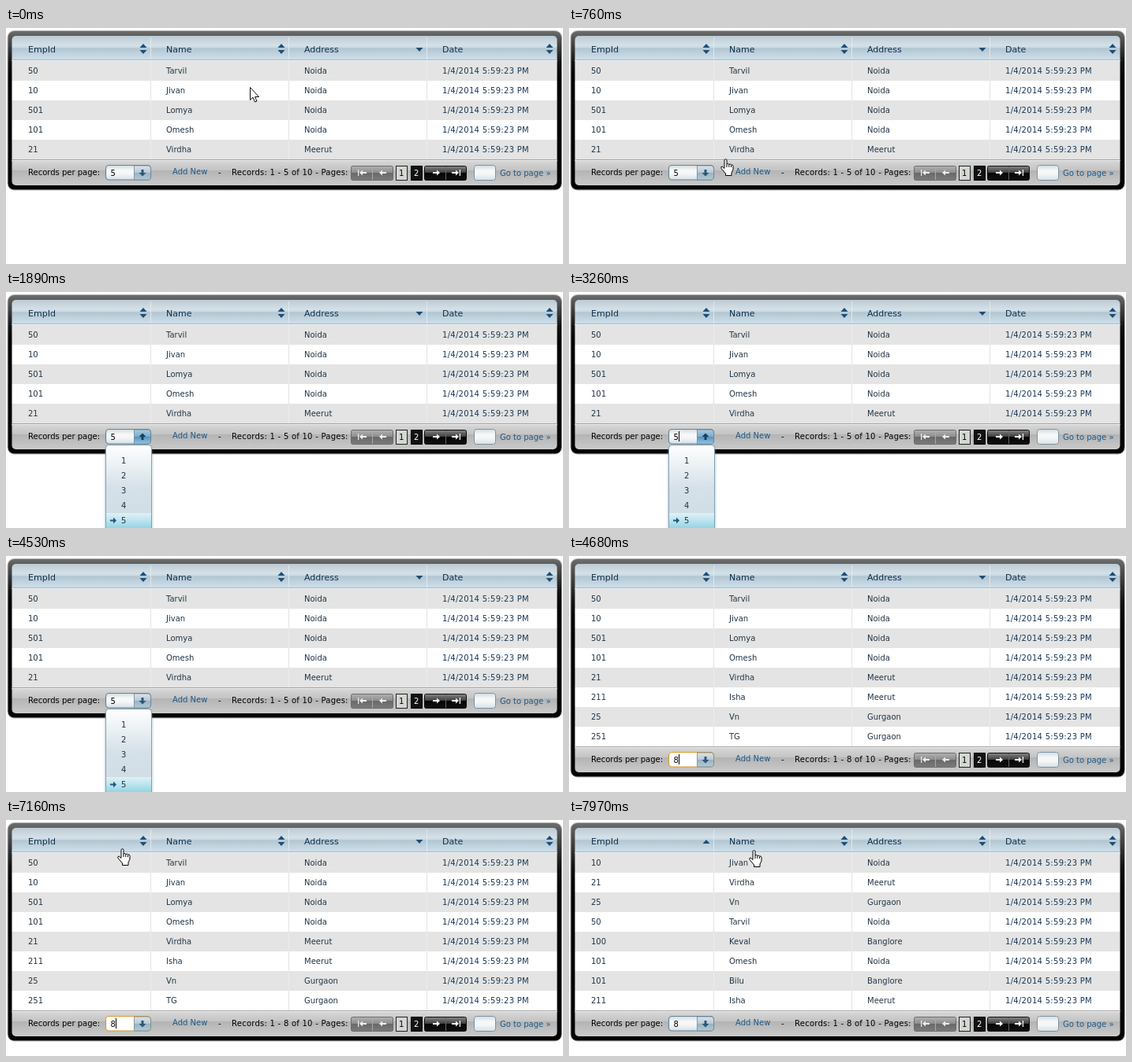
These frames come from a looping animation (706 by 300 pixels, 8 s). An HTML page:

```html
<!DOCTYPE html>
<html lang="en">
<head>
<meta charset="utf-8">
<title>Employee grid</title>
<style>
html, body { margin: 0; width: 100%; height: 100%; overflow: hidden; background: #fff; }
svg { display: block; width: 706px; height: 300px; }
text { font: 10px Verdana, "DejaVu Sans", sans-serif; fill: #223446; white-space: pre; }
.head { font-size: 11px; fill: #10304a; }
.date { letter-spacing: .29px; fill: #1a3858; }
.foot { fill: #000; }
.info { letter-spacing: .25px; }
.link { fill: #1c5a88; }
</style>
</head>
<body>
<svg id="stage" viewBox="0 0 706 300" xmlns="http://www.w3.org/2000/svg"></svg>
<script>
const LOOP = 8000, ROW = 25, TOP = 42;
const COLS = [28, 203, 378, 553];
const byCity = [
  ["50", "Tarvil", "Noida"], ["10", "Jivan", "Noida"], ["501", "Lomya", "Noida"],
  ["101", "Omesh", "Noida"], ["21", "Virdha", "Meerut"], ["211", "Isha", "Meerut"],
  ["25", "Vn", "Gurgaon"], ["251", "TG", "Gurgaon"]
];
const byId = [
  byCity[1], byCity[4], byCity[6], byCity[0], ["100", "Keval", "Banglore"],
  byCity[3], ["101", "Bilu", "Banglore"], byCity[5]
];

const grad = (id, ...stops) =>
  `<linearGradient id="${id}" x2="0" y2="1">` +
  stops.map(([o, c]) => `<stop offset="${o}" stop-color="${c}"/>`).join("") + `</linearGradient>`;
const rect = (x, y, w, h, fill, more = "") =>
  `<rect x="${x}" y="${y}" width="${w}" height="${h}" fill="${fill}" ${more}/>`;
const text = (x, y, s, cls = "", more = "") =>
  `<text x="${x}" y="${y}" class="${cls}" ${more}>${s}</text>`;
const path = (d, fill, more = "") => `<path d="${d}" fill="${fill}" ${more}/>`;
const upTri = (x, y) => path(`M${x} ${y + 5}h9l-4.5 -5z`, "#1d4f78");
const downTri = (x, y) => path(`M${x} ${y}h9l-4.5 5z`, "#1d4f78");

const defs = "<defs>" +
  grad("frame", [0, "#6e6e6e"], [.04, "#565656"], [.2, "#111"], [.3, "#000"], [1, "#000"]) +
  grad("header", [0, "#bccad3"], [.38, "#d5e1e8"], [.46, "#c9d8e1"], [.5, "#b2c6d2"], [.9, "#cbdde7"], [1, "#c3d5e0"]) +
  grad("footer", [0, "#d9d9d9"], [.42, "#c4c4c4"], [.44, "#b4b4b4"], [1, "#cacaca"]) +
  grad("field", [0, "#d3dce2"], [.35, "#f6f8f9"], [.6, "#f4f6f8"], [1, "#d6dfe5"]) +
  grad("btn", [0, "#dbe4ea"], [.48, "#bac9d3"], [.5, "#9cb2c0"], [1, "#b4c8d4"]) +
  grad("hot", [0, "#a9cbe2"], [.48, "#7cadcf"], [.5, "#5791b8"], [1, "#92c4e2"]) +
  grad("list", [0, "#fff"], [.12, "#f4f7f9"], [.45, "#d5e1e8"], [1, "#cbdae3"]) +
  grad("pick", [0, "#dff2f7"], [.5, "#b9e3ee"], [1, "#93d2e2"]) +
  grad("off", [0, "#b2b2b2"], [.48, "#8c8c8c"], [.5, "#6a6a6a"], [1, "#7a7a7a"]) +
  grad("on", [0, "#858585"], [.48, "#3c3c3c"], [.5, "#060606"], [1, "#101010"]) +
  "</defs>";

function sortIcon(x, dir) {
  if (dir > 0) return upTri(x, 25);
  if (dir < 0) return downTri(x, 25);
  return upTri(x, 20) + downTri(x, 28);
}

function header(sorted) {
  const dirs = sorted ? [1, 0, 0, 0] : [0, 0, -1, 0];
  let s = rect(7, 10, 692, 32, "url(#header)");
  ["EmpId", "Name", "Address", "Date"].forEach((name, i) => {
    s += text(COLS[i], 31, name, "head");
    s += sortIcon([169.5, 344.5, 519.5, 684.5][i], dirs[i]);
    if (i) s += rect(COLS[i] - 20, 12, 1, 28, "#dfe9ef");
  });
  return s + rect(7, 40, 692, 1, "#a9bcc8") + rect(7, 41, 692, 1, "#eef3f6");
}

function body(rows) {
  return rows.map((r, i) => {
    const y = TOP + i * ROW;
    let s = rect(7, y, 692, ROW, i % 2 ? "#fff" : "#e3e4e3");
    for (const x of COLS.slice(1)) s += rect(x - 20, y, 1, ROW, i % 2 ? "#e2e3e3" : "#ebeceb");
    r.forEach((v, c) => s += text(COLS[c], y + 16, v));
    return s + text(COLS[3], y + 16, "1/4/2014 5:59:23 PM", "date");
  }).join("");
}

const arrowLeft = (x, bar) =>
  path(`M${x} 184l4 -3.500v2.500h5v2h-5v2.500z`, "#eee") + (bar ? rect(x - 2, 180, 1.2, 8, "#eee") : "");
const arrowRight = (x, bar) =>
  path(`M${x} 184l-4 -3.500v2.500h-5v2h5v2.500z`, "#fff") + (bar ? rect(x + .8, 180, 1.2, 8, "#fff") : "");

function pager() {
  const group = (x, fill, edge) =>
    rect(x + .5, 175.5, 53, 18, `url(#${fill})`, `rx="2" stroke="${edge}"`) +
    rect(x + 27, 176, 1, 17, fill === "on" ? "#666" : "#aaa");
  return group(437, "off", "#6c6c6c") + arrowLeft(448, true) + arrowLeft(473) +
    rect(494.5, 175.5, 14, 18, "#d3d8d2", 'stroke="#222"') + text(498, 188, "1", "foot") +
    rect(513.5, 175.5, 14, 18, "#111", 'stroke="#000"') + text(517, 188, "2", "", 'style="fill:#fff"') +
    group(530, "on", "#111") + arrowRight(550) + arrowRight(574, true) +
    rect(593.5, 174.5, 27, 19, "url(#field)", 'rx="3" stroke="#7c929f"');
}

function combo(s) {
  const edge = s.focus ? "#d99a2b" : "#62849a";
  let g = rect(126.5, 174.5, 57, 18.5, s.white ? "#fff" : "url(#field)", `rx="4" stroke="${edge}" stroke-width="1.2"`);
  g += path("M162.500 175H180q3.500 0 3.500 4v9.500q0 4.500 -3.500 4.500H162.500z", `url(#${s.hot ? "hot" : "btn"})`, 'stroke="#68889c" stroke-width=".8"');
  g += s.up
    ? path("M173 179.500l4.500 4.500h-3v4h-3v-4h-3z", "#153f60")
    : path("M173 188.500l4.500 -4.500h-3v-4h-3v4h-3z", "#2a587a");
  g += text(132.5, 187.5, s.size, "foot");
  if (s.caret) g += rect(139, 177, 1, 13, "#000");
  return g;
}

function footer(s) {
  return rect(7, 167, 692, 33, "url(#footer)") + rect(7, 167, 692, 1, "#a3a3a3") + rect(7, 168, 692, 1, "#ededed") +
    text(28, 187, "Records per page:", "foot") + combo(s) +
    text(211, 186, "Add New", "link") + text(269, 187, "-", "foot") +
    text(286, 187, `Records: 1 - ${s.size} of 10 - Pages:`, "foot info") + pager() +
    text(626, 188, "Go to page »", "link");
}

function list() {
  let s = rect(125, 195, 61, 120, "none", 'rx="5" stroke="#7b99aa" stroke-opacity=".2" stroke-width="2"');
  s += rect(126.5, 194.5, 58, 120, "url(#list)", 'rx="4" stroke="#7f9fb1"');
  s += rect(127, 281, 57, 20, "url(#pick)");
  s += path("M140 290.500l-4 -4v3h-4v2h4v3z", "#1f5a7c");
  for (let i = 1; i < 6; i++) s += text(146, 199 + i * 19, i);
  return s;
}

// start, end, steps, from, bend, to, hand from step
const MOVES = [
  [0, 1, 2, 309, 75, 309, 75, 309, 75, 9],
  [150, 880, 6, 292, 88, 228, 138, 167, 185, 4],
  [1160, 1890, 6, 167, 185, 158, 235, 152, 304, 0],
  [5110, 6020, 7, 168, 306, 312, 165, 232, 48, 9],
  [6170, 7160, 8, 222, 33, 186, 34, 141, 36, 0],
  [7310, 7970, 6, 141, 36, 185, 39, 228, 38, 0]
];

function pointer(t) {
  const [a, b, n, x0, y0, cx, cy, x1, y1, hand] = MOVES.filter(m => m[0] <= t).pop();
  const k = Math.min(n - 1, Math.floor((t - a) / (b - a) * (n - 1) + .01));
  const u = k / (n - 1), v = 1 - u;
  const at = (p, q, r) => Math.round(v * v * p + 2 * u * v * q + u * u * r);
  const shape = k >= hand
    ? path("M5 1.500Q6.500 -.3 8 1.500V7Q9.500 5.800 10.800 7.400Q12.200 6.400 13.500 8Q15.500 7.200 16 9.500V14L14 18V21.500H6.500V19L1 12.500Q.2 10 2.200 10L5 12.500z", "#fff", 'stroke="#000"') +
      path("M8 7v4M10.800 7.500v3.500M13.500 8.500V11", "none", 'stroke="#000"')
    : path("M.5 .5V16.500L4 13.200L6.500 19L9 18L6.600 12.500H11.500z", "#fff", 'stroke="#0c0c18"');
  return `<g transform="translate(${at(x0, cx, x1)} ${at(y0, cy, y1)})">${shape}</g>`;
}

// the caret flips at each of these times
const BLINKS = [1160, 1740, 2300, 2730, 3260, 3820, 4380, 4530, 4680, 5110, 5640, 6200, 6750, 7310];

function render(t) {
  const large = t >= 4680, sorted = t >= 7440;
  const rows = sorted ? byId : byCity.slice(0, large ? 8 : 5);
  const shift = (rows.length - 5) * ROW;
  const state = {
    size: large ? 8 : 5,
    focus: large && t < 7310,
    white: (t >= 1160 && t < 1740) || (large && t < 7310),
    hot: t >= 880 && t < 4530,
    up: t >= 1160 && t < 4530,
    caret: BLINKS.filter(b => b <= t).length % 2 === 1
  };
  stage.innerHTML = defs +
    rect(2, 3.5, 702.5, 202.5 + shift, "none", 'rx="8.500" stroke="#b4b8b8"') +
    rect(2.5, 4, 701.5, 201.5 + shift, "url(#frame)", 'rx="8"') +
    `<clipPath id="inner">${rect(7.5, 10, 691, 190 + shift, "#fff", 'rx="5"')}</clipPath>` +
    `<g clip-path="url(#inner)">${header(sorted)}${body(rows)}` +
    `<g transform="translate(0 ${shift})">${footer(state)}</g></g>` +
    (t >= 1160 && !large ? list() : "") + pointer(t);
}

const stage = document.getElementById("stage");
let start, last;
function tick(now) {
  start ??= now;
  const t = Math.floor((now - start) % LOOP / 10) * 10;
  if (t !== last) render(last = t);
  requestAnimationFrame(tick);
}
render(0);
requestAnimationFrame(tick);
</script>
</body>
</html>
```
